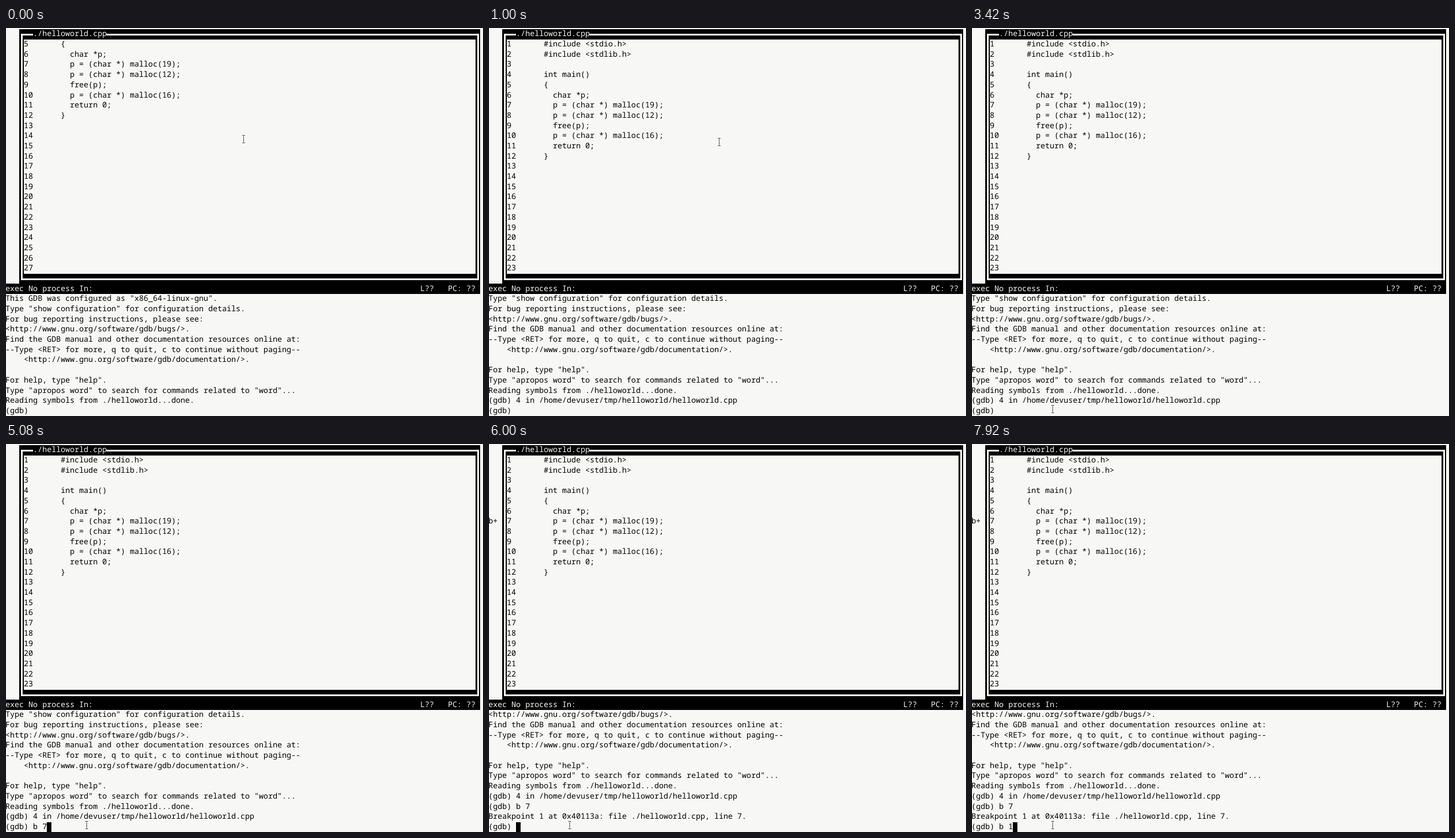
Write an HTML page with a canvas that moves like this. It is 830 by 674 pixels and loops after 8 s.

```html
<!DOCTYPE html>
<html lang="en">
<head>
<meta charset="utf-8">
<title>GDB text interface</title>
<style>
  html, body { margin: 0; width: 100%; height: 100%; overflow: hidden; background: #f7f7f5; }
  canvas { display: block; }
</style>
</head>
<body>
<canvas id="stage" width="830" height="674"></canvas>
<script>
const ctx = document.getElementById('stage').getContext('2d');
const LOOP = 8000, TICK = 1000 / 12;
const PAPER = '#f7f7f5', INK = '#000';
const CW = 8.02, RH = 17.69, X0 = -1, Y0 = 2.2, BASE = 12.2;

const CODE = [
  '#include <stdio.h>',
  '#include <stdlib.h>',
  '',
  'int main()',
  '{',
  '  char *p;',
  '  p = (char *) malloc(19);',
  '  p = (char *) malloc(12);',
  '  free(p);',
  '  p = (char *) malloc(16);',
  '  return 0;',
  '}'
];

const LOG = [
  'This GDB was configured as "x86_64-linux-gnu".',
  'Type "show configuration" for configuration details.',
  'For bug reporting instructions, please see:',
  '<http://www.gnu.org/software/gdb/bugs/>.',
  'Find the GDB manual and other documentation resources online at:',
  '--Type <RET> for more, q to quit, c to continue without paging--',
  '    <http://www.gnu.org/software/gdb/documentation/>.',
  '',
  'For help, type "help".',
  'Type "apropos word" to search for commands related to "word"...',
  'Reading symbols from ./helloworld...done.'
];
const LISTED = '(gdb) 4 in /home/devuser/tmp/helloworld/helloworld.cpp';
const BREAK = ['(gdb) b 7', 'Breakpoint 1 at 0x40113a: file ./helloworld.cpp, line 7.'];

// Each list holds [time, value] steps
const FIRST_LINE = [[0, 5], [500, 4], [580, 3], [830, 2], [920, 1]];
const TYPED = [[0, ''], [4420, 'b'], [4670, 'b '], [5080, 'b 7'], [5830, ''],
               [7330, 'b'], [7580, 'b '], [7920, 'b 1']];
const BLINKS = [330, 920, 1500, 2170, 2750, 3420, 4000, 5670, 5830, 6420, 7000];
const LIST_AT = 500, BREAK_AT = 5830;

const POINTER = [[0, 413, 193], [500, 400, 198], [1170, 400, 198], [1670, 160, 630],
                 [2170, 146, 661], [2999, 146, 661], [3000, 140, 662]];

const colX = c => X0 + c * CW;
const rowY = r => Y0 + r * RH;
const midPixel = v => Math.round(v) + 0.5;
const stepAt = (steps, t) => steps.filter(s => s[0] <= t).pop()[1];

function cells(c, r, w, h, color) {
  const x = Math.round(colX(c)), y = Math.round(rowY(r));
  ctx.fillStyle = color;
  ctx.fillRect(x, y, Math.round(colX(c + w)) - x, Math.round(rowY(r + h)) - y);
}

function print(text, c, r, color = INK) {
  ctx.fillStyle = color;
  [...text].forEach((ch, i) => {
    if (ch !== ' ') ctx.fillText(ch, colX(c + i), rowY(r) + BASE);
  });
}

function drawFrame() {
  cells(3, 0, 100, 25, INK);
  ctx.strokeStyle = PAPER;
  ctx.lineWidth = 3;
  const left = midPixel(colX(3.5)), top = midPixel(rowY(0.5));
  ctx.strokeRect(left, top, midPixel(colX(102.5)) - left, midPixel(rowY(24.5)) - top);
  cells(4, 1, 98, 23, PAPER);
  cells(6, 0, 16, 1, INK);
  print('./helloworld.cpp', 6, 0, PAPER);
  cells(0, 25, 103, 1, INK);
  print('exec No process In:', 0, 25, PAPER);
  print('L??   PC: ??', 90, 25, PAPER);
}

function drawCode(t) {
  const first = stepAt(FIRST_LINE, t);
  for (let r = 1; r <= 23; r++) {
    const n = first + r - 1;
    print(String(n), 4, r);
    print(CODE[n - 1] || '', 12, r);
    if (n === 7 && t >= BREAK_AT) print('b+', 0, r);
  }
}

function drawConsole(t) {
  const prompt = '(gdb) ' + stepAt(TYPED, t);
  const lines = [...LOG];
  if (t >= LIST_AT) lines.push(LISTED);
  if (t >= BREAK_AT) lines.push(...BREAK);
  lines.push(prompt);
  lines.slice(-12).forEach((line, i) => print(line, 0, 26 + i));
  if (BLINKS.filter(b => b <= t).length % 2) cells(prompt.length, 37, 1, 1, INK);
}

function pointerAt(t) {
  const q = Math.floor((t + 5) / TICK) * 1000 / 12;
  const i = POINTER.findIndex(p => p[0] > q);
  if (i < 0) return POINTER[POINTER.length - 1].slice(1);
  const a = POINTER[i - 1], b = POINTER[i];
  const k = (q - a[0]) / (b[0] - a[0]);
  return [a[1] + (b[1] - a[1]) * k, a[2] + (b[2] - a[2]) * k];
}

function drawPointer(t) {
  const [x, y] = pointerAt(t).map(midPixel);
  ctx.beginPath();
  ctx.moveTo(x, y - 6);
  ctx.lineTo(x, y + 5);
  for (const dy of [-7, 6]) {
    ctx.moveTo(x - 2.5, y + dy);
    ctx.lineTo(x + 2.5, y + dy);
  }
  for (const [w, color] of [[3, '#fff'], [1, '#444']]) {
    ctx.lineWidth = w;
    ctx.strokeStyle = color;
    ctx.stroke();
  }
}

function draw(t) {
  ctx.fillStyle = PAPER;
  ctx.fillRect(0, 0, 830, 674);
  ctx.font = '13.37px "Noto Sans Mono", "DejaVu Sans Mono", monospace';
  ctx.textRendering = 'geometricPrecision';
  drawFrame();
  drawCode(t);
  drawConsole(t);
  drawPointer(t);
}

const start = performance.now();
function tick() {
  draw((performance.now() - start) % LOOP);
  requestAnimationFrame(tick);
}
tick();
</script>
</body>
</html>
```
